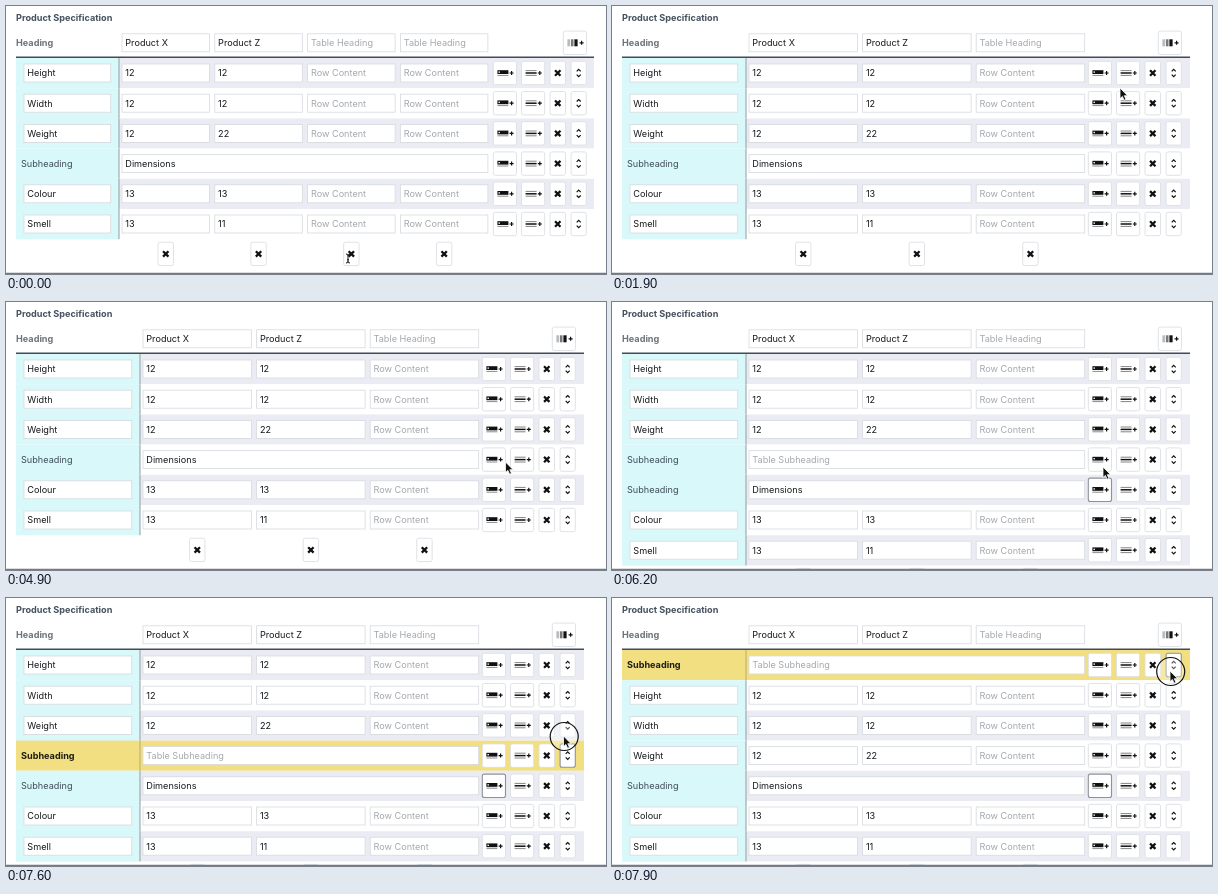
Write an HTML page that moves like this. It is 600 px wide and 268 px high and loops after 8 s.

```html
<!DOCTYPE html>
<html lang="en">
<head>
<meta charset="utf-8">
<title>Table editor</title>
<style>
  html, body { margin: 0; width: 100%; height: 100%; overflow: hidden; background: #fff; }
  svg { display: block; }
  text { font: 9.15px Inter, "Noto Sans", sans-serif; fill: #16181c; }
  .title { font-weight: 700; fill: #45515f; }
  .head { font-weight: 700; fill: #6c737b; }
  .label { fill: #3f4d5a; }
  .grabbed { font-weight: 700; fill: #1d1d14; }
  .hint { fill: #a4a8ad; }
  .input { fill: #fff; stroke: #d5d9df; stroke-width: .8; }
  .button { fill: #fff; stroke: #dcdfe4; stroke-width: .9; }
  .focus { stroke: #8d9299; stroke-width: 1.1; }
  .stroke { fill: none; stroke: #111; }
</style>
</head>
<body>
<svg width="600" height="268" viewBox="0 0 600 268">
  <g id="table"></g>
  <path d="M0 267.4H600" stroke="#777a7e" stroke-width="1.1"/>
  <circle id="press" r="14" fill="#fff" fill-opacity=".3" stroke="#111" stroke-width="1.2"/>
  <path id="arrow" d="M0 0V10.6L2.4 8.4L4.1 12.2L6 11.4L4.3 7.7H7.6Z" fill="#111" stroke="#fff" stroke-width=".8"/>
  <path id="beam" d="M-2 -4Q0 -4 0 -2.6Q0 -4 2 -4M0 -3V4M-2 5Q0 5 0 3.6Q0 5 2 5M-1 1.8H1" class="stroke"/>
</svg>
<script>
const LOOP = 8000, STEP = 100, ROW = 30.2, TOP = 52;
const REMOVE_COLUMN = 1100, ADD_ROW = 5800, GRAB = 7500;

const wide = { split: 113, x: 116, gap: 92.8, w: 87.5, tools: 487.3, end: 588, heads: ["Product X", "Product Z", "", ""] };
const narrow = { split: 134, x: 137, gap: 113.6, w: 108.5, tools: 476.3, end: 578, heads: ["Product X", "Product Z", ""] };

const size = (name, a, b) => ({ name, cells: [a, b] });
const added = { sub: "" };
const dims = { sub: "Dimensions" };
const upper = [size("Height", 12, 12), size("Width", 12, 12), size("Weight", 12, 22)];
const lower = [dims, size("Colour", 13, 13), size("Smell", 13, 11)];

// Pointer path: time, x, y
const path = [
  [0, 341, 249], [1100, 341, 249], [1900, 508, 82], [2300, 565, 76], [2500, 565, 76],
  [3200, 543, 96], [3900, 543, 96], [4700, 501, 162], [4900, 499.5, 160], [5100, 499.5, 160],
  [5500, 491, 165], [6600, 491, 165], [7400, 561, 156], [7500, 558, 157], [7600, 557.5, 138], [7900, 558, 73]
];

const $ = id => document.getElementById(id);
const rect = (x, y, w, h, attrs) => `<rect x="${x}" y="${y}" width="${w}" height="${h}" ${attrs}/>`;
const text = (x, y, s, cls = "") => `<text x="${x}" y="${y}" class="${cls}">${s}</text>`;
const line = (d, color, w) => `<path d="${d}" fill="none" stroke="${color}" stroke-width="${w}"/>`;

function input(x, cy, w, value, hint) {
  return rect(x, cy - 9, w, 18, 'class="input"') +
    text(x + 3.3, cy + 3.3, value || hint, value ? "" : "hint");
}

const plus = x => line(`M${x - 2} 0h4M${x} -2v4`, "#111", 1.2);
const icons = {
  heading: rect(-7.5, -2.8, 11, 3.8, 'fill="#111"') + rect(-6.4, -1.6, 1.4, 1.4, 'fill="#fff"') +
    line("M-7.5 2.4h11", "#8a8d91", 1) + plus(6.7),
  row: line("M-7.5 -2.4h11M-7.5 2.4h11", "#777", .9) + line("M-7.5 0h11", "#111", 1.5) + plus(6.7),
  column: rect(-7.5, -3.5, 2.6, 7, 'fill="#b9bbbe"') + rect(-4, -3.5, 2.6, 7, 'fill="#77797c"') +
    rect(-.5, -3.5, 3.2, 7, 'fill="#111"') + plus(6.7),
  remove: line("M-2.7 -2.7L2.7 2.7M2.7 -2.7L-2.7 2.7", "#111", 2.3),
  move: line("M-2 -1.7L0 -3.7L2 -1.7M-2 1.7L0 3.7L2 1.7", "#111", 1.2)
};

function button(x, cy, w, icon, focused) {
  return rect(x, cy - 11.7, w, 23.4, `rx="2" class="button${focused ? " focus" : ""}"`) +
    `<g transform="translate(${x + w / 2} ${cy})">${icons[icon]}</g>`;
}

function drawRow(row, i, l, grabbed, focused) {
  const y = TOP + i * ROW, cy = y + 15;
  let out = rect(10, y, l.end - 10, ROW, `fill="${grabbed ? "#f2df82" : i % 2 ? "#fff" : "#ebecf3"}"`);
  if (!grabbed) out += rect(10, y, l.split - 10, ROW + .1, 'fill="#d8f8fa"');
  out += line(`M${l.split} ${y}v${ROW}`, grabbed ? "#b5aa70" : "#8f9da3", 1);
  if ("sub" in row) {
    const last = l.x + l.gap * (l.heads.length - 1) + l.w;
    out += text(15, cy + 3.3, "Subheading", grabbed ? "grabbed" : "label");
    out += input(l.x, cy, last - l.x, row.sub, "Table Subheading");
  } else {
    out += input(18, cy, l.w - .8, row.name);
    l.heads.forEach((_, c) => out += input(l.x + c * l.gap, cy, l.w, row.cells[c], "Row Content"));
  }
  return out + button(l.tools, cy, 23.2, "heading", focused) + button(l.tools + 28.2, cy, 23.2, "row") +
    button(l.tools + 56.7, cy, 15.5, "remove") + button(l.tools + 77.8, cy, 15.2, "move", grabbed);
}

function drawTable(l, rows, grabbing, focusing) {
  let out = text(10, 15.2, "Product Specification", "title") + text(10, 40.2, "Heading", "head");
  l.heads.forEach((h, c) => out += input(l.x + c * l.gap, 36.8, l.w, h, "Table Heading"));
  out += button(l.tools + 70, 36.8, 23.2, "column");
  rows.forEach((row, i) => out += drawRow(row, i, l, grabbing && row === added, focusing && row === dims));
  out += line(`M10 51.3H${l.end}`, "#434a58", 1.5);
  const cy = TOP + rows.length * ROW + 14.7;
  l.heads.forEach((_, c) => out += button(l.x + c * l.gap + l.w / 2 - 7.7, cy, 15.4, "remove"));
  return out;
}

function pointer(t) {
  const i = path.findIndex(p => p[0] > t);
  if (i < 0) return path[path.length - 1].slice(1);
  const [t0, x0, y0] = path[i - 1], [t1, x1, y1] = path[i];
  let k = (t - t0) / (t1 - t0);
  if (t < GRAB) k = k * k * (3 - 2 * k);
  return [x0 + (x1 - x0) * k, y0 + (y1 - y0) * k];
}

let shown = "";
function render(t) {
  const [x, y] = pointer(t);
  const inserted = t >= ADD_ROW, grabbing = t >= GRAB;
  const slot = !grabbing ? 3 : Math.max(0, Math.min(3, Math.floor((y - TOP + 8) / ROW)));
  const layout = t < REMOVE_COLUMN ? wide : narrow;
  const key = [layout.split, inserted, grabbing, slot].join();
  if (key !== shown) {
    const rows = [...upper, ...lower];
    if (inserted) rows.splice(slot, 0, added);
    $("table").innerHTML = drawTable(layout, rows, grabbing, inserted);
    shown = key;
  }
  const overText = t < 300;
  $("beam").style.display = overText ? "" : "none";
  $("arrow").style.display = overText ? "none" : "";
  $("press").style.display = grabbing ? "" : "none";
  $("beam").setAttribute("transform", `translate(${x + 1} ${y + 3})`);
  $("arrow").setAttribute("transform", `translate(${x} ${y})`);
  $("press").setAttribute("transform", `translate(${x + .7} ${y + .5})`);
}

function tick() {
  const t = performance.now() % LOOP;
  render(Math.floor(t / STEP) * STEP);
  requestAnimationFrame(tick);
}
tick();
</script>
</body>
</html>
```
